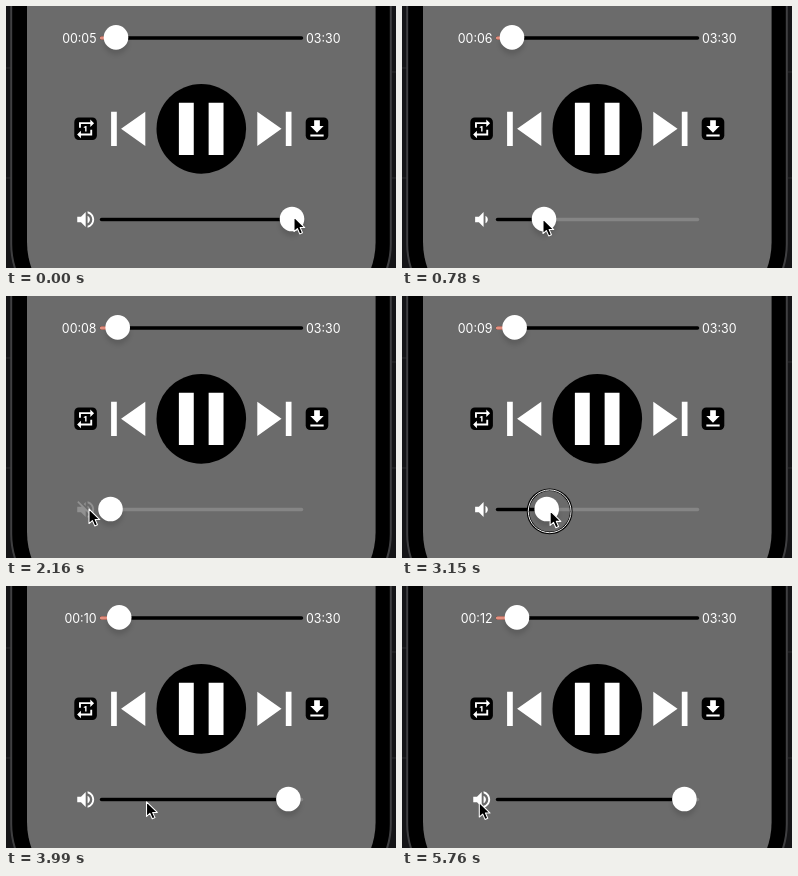
An HTML page for the animation above (6420 ms loop, 390x262 px).

```html
<!DOCTYPE html>
<html lang="en">
<head>
<meta charset="utf-8">
<title>Audio player controls</title>
<style>
html, body { margin: 0; width: 100%; height: 100%; overflow: hidden; background: #151517; }
svg { display: block; width: 390px; height: 262px; }
text { font: 12.4px Inter, Roboto, sans-serif; fill: #fff; }
.track { stroke-width: 3.5; stroke-linecap: round; }
.thumb { fill: #fff; filter: drop-shadow(0 5.5px 2px rgba(0, 0, 0, .12)); }
.icon { fill: #fff; }
</style>
</head>
<body>
<svg viewBox="0 0 390 262">
  <path d="M0 62H5M0 172H5M386 66H390M386 172H390" stroke="#2c2c2f"/>
  <rect x="5.2" y="-100" width="379.6" height="418" rx="80" fill="#000" stroke="#3f3f41" stroke-width="2"/>
  <rect x="21" y="-100" width="348.6" height="414" rx="78" fill="#6b6b6b"/>

  <text id="elapsed" x="90.5" y="36.6" text-anchor="end"></text>
  <text x="300" y="36.6">03:30</text>
  <path class="track" d="M95.5 32H295.5" stroke="#000"/>
  <path class="track" id="played" stroke="#e58f7f"/>
  <circle class="thumb" id="seek" cy="31.4" r="12.3"/>

  <rect x="68.3" y="111.5" width="22.6" height="22.6" rx="4.5"/>
  <rect x="299.7" y="111.5" width="22.6" height="22.6" rx="4.5"/>
  <circle cx="195.3" cy="122.9" r="44.8"/>
  <g class="icon">
    <path transform="translate(79.6 122.8) scale(.94) translate(-12 -12)" d="M7 7h10v3l4-4-4-4v3H5v6h2zM17 17H7v-3l-4 4 4 4v-3h12v-6h-2zM13 15V9h-1l-2 1v1h1.5v4z"/>
    <path transform="translate(311 122.4) scale(.95) translate(-12 -11.5)" d="M19 9h-4V3H9v6H5l7 7zM5 18v2h14v-2z"/>
    <path transform="translate(122.2 122.8) scale(2.85) translate(-12 -12)" d="M6 6h2v12H6zM9.5 12l8.5 6V6z"/>
    <path transform="translate(268.4 122.8) scale(2.85) translate(-12 -12)" d="M6 18l8.5-6L6 6zM16 6v12h2V6z"/>
    <path transform="translate(195.2 122.9) scale(3.72) translate(-12 -12)" d="M6 5h4v14H6zM14 5h4v14h-4z"/>
    <path id="speaker" transform="translate(79.7 213.5) scale(.94) translate(-12 -12)"/>
  </g>

  <path class="track" d="M95.5 213.6H295.5" stroke="#858585"/>
  <path class="track" id="level" stroke="#000"/>
  <circle class="thumb" id="volume" cy="213" r="12.3"/>

  <g id="pointer">
    <g id="ring" fill="none" transform="translate(-.5 .5)">
      <circle r="21.6" stroke="#000" stroke-width="2.6"/>
      <circle r="21.4" stroke="#eee" stroke-width="1"/>
    </g>
    <path transform="scale(.96)" d="M0 0V15.2L3.5 12 6 17.6 8.8 16.4 6.4 11H11.2Z" stroke="#fff" stroke-width="1.1" stroke-linejoin="round"/>
  </g>
</svg>
<script>
const LOOP = 6420, MIN_X = 104.5;
const $ = id => document.getElementById(id);

const icons = {
  up: 'M3 9v6h4l5 5V4L7 9zM16.5 12c0-1.77-1.02-3.29-2.5-4.03v8.05c1.48-.73 2.5-2.25 2.5-4.02zM14 3.23v2.06c2.89.86 5 3.54 5 6.71s-2.11 5.85-5 6.71v2.06c4.01-.91 7-4.49 7-8.77s-2.99-7.86-7-8.77z',
  down: 'M18.5 12c0-1.77-1.02-3.29-2.5-4.03v8.05c1.48-.73 2.5-2.25 2.5-4.02zM5 9v6h4l5 5V4L9 9z',
  off: 'M16.5 12c0-1.77-1.02-3.29-2.5-4.03v2.21l2.45 2.45c.03-.2.05-.41.05-.63zm2.5 0c0 .94-.2 1.82-.54 2.64l1.51 1.51C20.63 14.91 21 13.5 21 12c0-4.28-2.99-7.86-7-8.77v2.06c2.89.86 5 3.54 5 6.71zM4.27 3L3 4.27 7.73 9H3v6h4l5 5v-6.73l4.25 4.25c-.67.52-1.42.93-2.25 1.18v2.06c1.38-.31 2.63-.95 3.69-1.81L19.73 21 21 19.73l-9-9zM12 4L9.91 6.09 12 8.18z'
};

// Pointer moves: start, end, x, y; drags also carry the volume thumb
const moves = [
  { from: 90, to: 600, x: 141, y: 213, thumb: 142 },
  { from: 770, to: 1120, x: 83, y: 213 },
  { from: 2380, to: 2960, x: 145.5, y: 214.8 },
  { from: 3090, to: 3450, x: 281, y: 214.5, thumb: 282.4 },
  { from: 3710, to: 4200, x: 77.3, y: 216.5 }
];
// Taps on the speaker: press, lift, mute toggle
const taps = [[1140, 1240, 1280], [2040, 2140, 2190], [4230, 4340, 4375], [5370, 5470, 5510]];
const drags = [[60, 620], [2990, 3530]];
const labelTicks = [120, 1050, 2050, 2650, 3930, 4850, 5700];
const seekSteps = [[0, 110], [920, 110.8], [1820, 111.7], [2760, 112.6], [3730, 113.2], [4400, 113.6], [5500, 115]];

const clamp = u => Math.min(1, Math.max(0, u));
const cubic = u => u < .5 ? 4 * u ** 3 : 1 - 4 * (1 - u) ** 3;
const quad = u => u < .5 ? 2 * u * u : 1 - 2 * (1 - u) ** 2;

function pose(t) {
  const p = { x: 288, y: 211, thumb: 286 };
  for (const m of moves) {
    const u = cubic(clamp((t - m.from) / (m.to - m.from)));
    for (const k of ['x', 'y', 'thumb']) if (k in m) p[k] += (m[k] - p[k]) * u;
  }
  return p;
}

function speakerOpacity(t) {
  const tap = taps.find(([press, , toggle]) => t >= press && t < toggle + 250);
  if (!tap) return 1;
  const [press, , toggle] = tap;
  return t < toggle
    ? 1 - .8 * quad(clamp((t - press) / 150))
    : .2 + .8 * quad((t - toggle) / 250);
}

function fill(id, x) {
  $(id).setAttribute('d', `M95.5 ${id === 'played' ? 32 : 213.6}H${x}`);
}

function draw(now) {
  const t = now % LOOP;
  const { x, y, thumb } = pose(t);
  const muted = taps.filter(tap => t >= tap[2]).length % 2 === 1;
  const volX = muted ? MIN_X : thumb;
  const seekX = seekSteps.filter(s => t >= s[0]).pop()[1];
  const seconds = 5 + labelTicks.filter(s => t >= s).length;

  $('elapsed').textContent = '00:' + String(seconds).padStart(2, '0');
  $('seek').setAttribute('cx', seekX);
  fill('played', seekX);

  $('volume').setAttribute('cx', volX);
  fill('level', volX);
  $('level').style.display = muted ? 'none' : '';
  $('speaker').setAttribute('d', icons[muted ? 'off' : volX > 195 ? 'up' : 'down']);
  $('speaker').style.opacity = speakerOpacity(t);

  $('pointer').setAttribute('transform', `translate(${x} ${y})`);
  const pressed = [...drags, ...taps].some(([on, off]) => t >= on && t < off);
  $('ring').style.display = pressed ? '' : 'none';
}

const start = performance.now();
(function frame() {
  draw(performance.now() - start);
  requestAnimationFrame(frame);
})();
</script>
</body>
</html>
```
